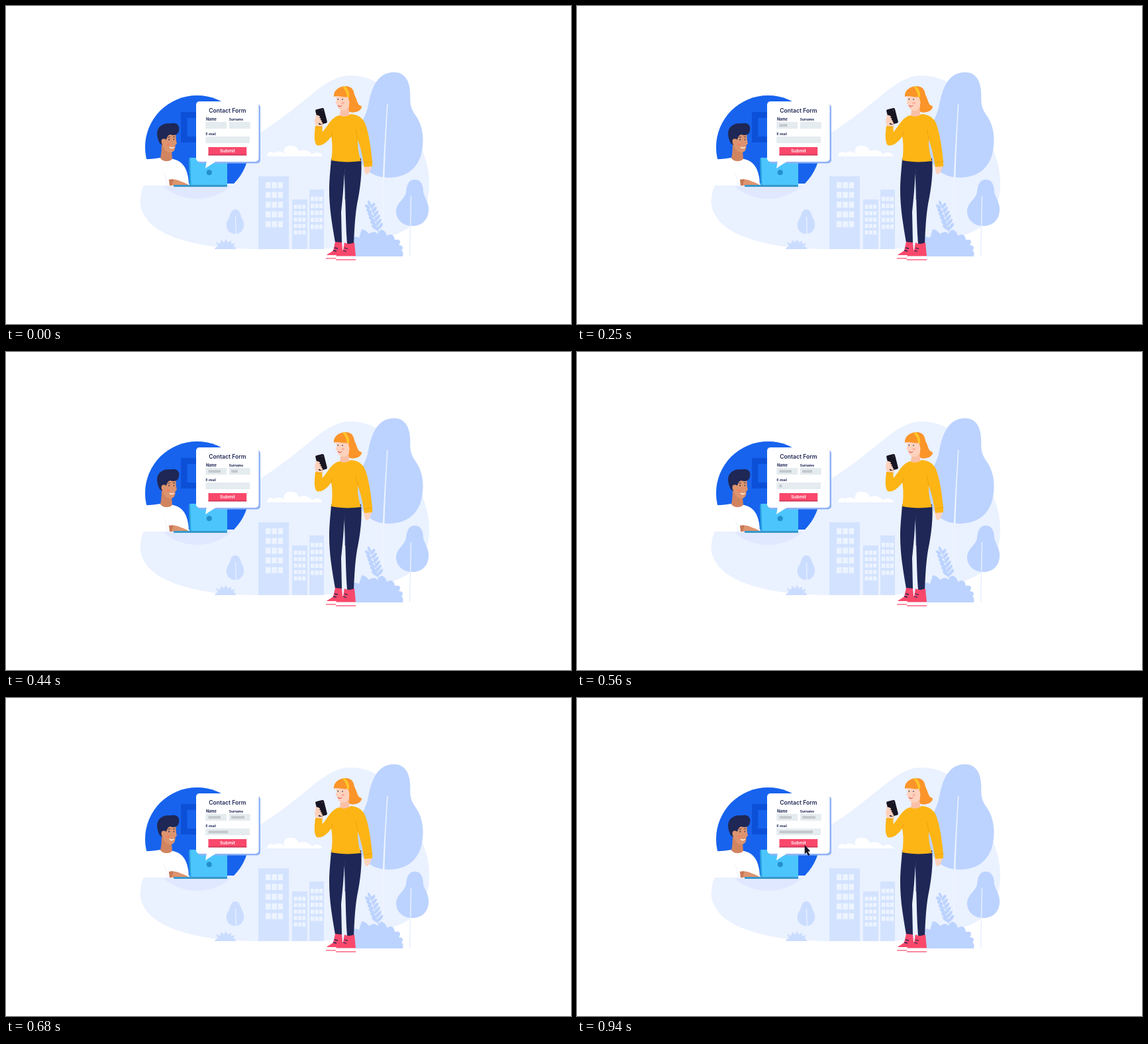
These frames come from a looping animation (853x480 px, 1 s). An HTML page with a canvas:

```html
<!DOCTYPE html>
<html lang="en">
<head>
<meta charset="utf-8">
<title>Contact form</title>
<style>
  html, body { margin: 0; width: 100%; height: 100%; overflow: hidden; background: #fff; }
  canvas { display: block; width: 853px; height: 480px; }
</style>
</head>
<body>
<canvas id="stage"></canvas>
<script>
const W = 853, H = 480, LOOP = 1000, TICKS = 16;
const canvas = document.getElementById('stage');
const ctx = canvas.getContext('2d');
const dpr = window.devicePixelRatio || 1;
canvas.width = Math.round(W * dpr);
canvas.height = Math.round(H * dpr);

const C = {
  blob: '#eaf1ff', building: '#d3e3ff', pane: '#edf4ff', tree: '#bcd3ff',
  blue: '#1763ee', frame: '#0d50d8', navy: '#1e2755', tan: '#dd946e',
  skin: '#fdd2bd', hair: '#fb9429', yellow: '#fdb515', pink: '#f9486b',
  field: '#e5ecf0', bar: '#c3c8cd', laptop: '#4cc5fd', base: '#3798cc'
};

function fill(d, color) {
  ctx.fillStyle = color;
  ctx.fill(new Path2D(d));
}
function line(d, color, width) {
  ctx.strokeStyle = color;
  ctx.lineWidth = width;
  ctx.stroke(new Path2D(d));
}
function rect(x, y, w, h, color) {
  ctx.fillStyle = color;
  ctx.fillRect(x, y, w, h);
}
function round(x, y, w, h, r, color) {
  ctx.fillStyle = color;
  ctx.beginPath();
  ctx.roundRect(x, y, w, h, r);
  ctx.fill();
}
function oval(x, y, rx, ry, color, turn = 0) {
  ctx.fillStyle = color;
  ctx.beginPath();
  ctx.ellipse(x, y, rx, ry, turn, 0, Math.PI * 2);
  ctx.fill();
}
function text(s, x, y, size, color, weight = 700, align = 'left') {
  ctx.font = `${weight} ${size}px Inter, sans-serif`;
  ctx.textAlign = align;
  ctx.fillStyle = color;
  ctx.fillText(s, x, y);
}
const clamp = (v, max) => Math.max(0, Math.min(max, v));

function building(x, y, w, win) {
  rect(x, y, w, 367 - y, C.building);
  for (let r = 0; r < 5; r++)
    for (let c = 0; c < 3; c++)
      rect(win.x + c * win.dx, win.y + r * win.dy, win.w, win.h, C.pane);
}

function backdrop() {
  fill('M208 271 L347 268 C365 238 367 207 383 192 C411 174 431 158 456 138 C480 118 498 105 520 105 ' +
       'C558 105 579 127 597 158 C616 191 639 226 639 267 C639 317 614 338 577 348 ' +
       'C545 357 514 367 455 367 H385 C329 367 278 361 242 344 C204 326 195 296 208 271Z', C.blob);

  fill('M394 227 C394 220 401 218 405 222 C410 218 416 219 420 223 C418 214 424 210 431 211 ' +
       'C438 211 441 215 442 219 C450 216 458 218 462 224 C467 219 475 220 478 227Z', '#fff');

  building(381, 257, 46, { x: 392, y: 266, dx: 9.3, dy: 14.7, w: 7.5, h: 9 });
  building(432, 292, 23, { x: 434.6, y: 300, dx: 6.3, dy: 9.7, w: 5, h: 6 });
  building(458, 277, 22, { x: 460, y: 288, dx: 6.4, dy: 10.5, w: 5.2, h: 6.5 });

  const pale = '#cbddff';
  fill('M346 307 C353 307 354 315 356 320 C363 330 358 344 346 344 C334 344 329 331 336 321 C339 316 339 307 346 307Z', pale);
  line('M346.5 318 L348 367', C.blob, 1.2);
  fill('M315 367 C316 364 318 363 320 363 L317 356 L323 359 L325 353 L329 357 L332 352 L335 357 L340 354 ' +
       'L340 359 L346 358 L343 363 C346 363 347 365 347 367Z', pale);

  // large tree
  fill('M586 100 C602 100 609 113 610 129 C611 145 608 150 619 166 C631 183 632 207 626 227 ' +
       'C618 249 601 259 577 259 C549 259 530 239 530 211 C530 185 540 174 546 154 C551 126 559 100 586 100Z', C.tree);
  fill('M575 148 L576.5 148 C573 207 571 250 570.5 326 L567.5 326 C568 247 572 205 575 148Z', '#eef4ff');

  // small tree
  fill('M617 262 C628 262 630 273 630 281 C632 290 639 297 638 309 C637 324 627 332 613 332 ' +
       'C599 332 589 322 589 310 C589 297 602 292 604 281 C605 272 607 262 617 262Z', C.tree);
  line('M611.5 287 L609.5 378', '#e7efff', 1.5);

  // fern
  line('M547 294 C553 307 560 322 562 342', C.tree, 1.5);
  for (let i = 0; i < 6; i++) {
    const x = 550 + i * 2.2, y = 304 + i * 6.3, r = 4.6 + Math.min(i, 3) * 0.5;
    oval(x - 4, y - 1, r, 2.3, C.tree, 0.65);
    oval(x + 4, y - 3, r, 2.3, C.tree, -0.9);
  }
  oval(548.5, 298, 2, 4.3, C.tree, -0.4);

  fill('M522 378 V352 C525 347 529 348 533 350 L537 337 C541 337 545 340 548 344 ' +
       'C553 341 557 339 561 344 L565 338 C570 337 574 342 575 347 C581 343 586 345 587 353 ' +
       'C593 351 598 354 593 361 C599 361 601 365 597 369 C600 371 600 375 599 378Z', C.tree);
}

function man() {
  oval(288.5, 213, 78.5, 78, C.blue);
  rect(264, 160, 30, 46, C.frame);
  rect(273.5, 169, 20, 28, C.blue);

  // table and the dim lower part of the disc
  ctx.save();
  ctx.beginPath();
  ctx.rect(200, 268, 170, 26);
  ctx.clip();
  rect(208, 268, 150, 25, C.blob);
  rect(204, 268, 30, 3, '#fff');
  ctx.beginPath();
  ctx.rect(200, 272, 170, 22);
  ctx.clip();
  oval(288.5, 213, 78.5, 78, '#dfe8ff');
  ctx.restore();
  fill('M358 268 H372 V292 H310 C332 290 349 281 358 268Z', C.blob);
  fill('M196 293 V268 H208.8 C206 273 204 279 203 293Z', '#fff');

  fill('M206 271 V231 C217 232 224 230 234 229 C248 229 262 231 269 242 C274 250 276 260 276 271Z', '#fff');
  fill('M235 202 L250 218 L251 231 C246 236 237 235 233 230 C235 222 235 211 235 202Z', '#d18460');
  fill('M237 190 C245 187 252 187 256 190 C257 196 256 201 258 208 L255.5 210 C256 216 254 220 249 221 ' +
       'C241 222 236 213 236 204Z', C.tan);
  fill('M232 207 C227 197 226 185 235 180 C240 176 247 178 251 177 C258 176 263 181 261 188 ' +
       'C260 195 254 196 248 194 C244 195 243 198 242 202 C237 198 234 203 236 210Z', C.navy);
  oval(237.4, 204.5, 2.8, 4, C.tan);
  oval(246.2, 201.7, 0.8, 1.1, C.navy);
  oval(253.5, 201.5, 0.7, 1.1, C.navy);
  oval(244.5, 209, 2.4, 1.8, '#ef7f64');
  line('M247 213 Q250 216 253.5 213', '#fff', 1.4);
  line('M244 198.3 L248 197.5 M252 197.4 L255 197.8', C.navy, 0.8);

  line('M238 252 C242 257 243 263 243 271', '#e5eaf5', 0.8);
  fill('M246 262 C255 260 262 264 270 267 L278 271 H248Z', C.tan);
  fill('M246 262 L253 261.5 L250 271 H247Z', '#c87958');

  fill('M277 229 H332 Q334 229 334 231 V271 H279Z', C.laptop);
  fill('M276 231 Q276 229 278 229 L279.5 271 H277Z', '#279fe0');
  round(253, 270, 81, 3, 1, C.base);
  oval(306.8, 251.3, 4, 4, '#258fce');
}

function woman() {
  // legs
  fill('M491 230 H536 C538 250 535 275 530 299 C527 317 526 336 525 360 H515 C513 336 513 311 512 286 ' +
       'L510.5 253 C510 273 508 291 506 311 L507 357 H497 C492 328 488 304 488 278 C488 260 490 246 491 230Z', C.navy);
  line('M511.5 246 C513 264 512 278 512 292', '#364071', 0.7);

  // shoes
  fill('M497 356 L507 357 L509 377 H484 C484 374 490 373 494 369Z', C.pink);
  fill('M484 376 H504 V380 H483Z', '#fff');
  line('M483 381 H503', C.pink, 1.2);
  fill('M511 357 C516 360 521 359 526 357 L528 378 H498 C499 374 506 374 509 368Z', C.pink);
  fill('M498 377.5 H528 V382 H498Z', '#fff');
  line('M498 383 H528', C.pink, 1.3);
  line('M496 365 L501 366 M494 369 L499 370 M511 365 L516 366.5 M509 369 L514 370.5', C.navy, 1.3);

  // lowered hand
  fill('M540 240 L552 240 C551 247 549 253 544 254 C541 252 541 247 540 240Z', C.skin);

  // neck and hair
  fill('M514 127 C524 126 527 136 529 144 C531 149 535 151 537 151 C536 156 532 160 527 160 ' +
       'C522 162 516 159 513 157Z', C.hair);
  fill('M506 149 L518 145 V165 C515 169 506 169 504 166Z', '#f9c0a7');
  fill('M498 134 C504 129 512 130 518 136 C520 146 518 156 511 158 C504 158 500 154 500 149 L497.5 147 L499 142Z', C.skin);
  fill('M495 137 C494 128 502 121 513 121 C521 121 525 126 526 134 C530 141 530 149 537 153 ' +
       'C534 160 525 162 517 157 C520 148 518 141 516 137 C509 139 502 134 495 137Z', C.hair);
  fill('M508 122 L512 121 C516 125 519 131 518 138 L515 137 C514 131 512 126 508 122Z', '#ffc629');
  oval(516.5, 146, 2, 2.7, C.skin);
  oval(501.3, 140.8, 0.7, 1, C.navy);
  oval(508, 141, 0.7, 1, C.navy);
  oval(508.7, 146.5, 2.3, 1.7, '#ffae9e');
  line('M501 150 Q504 153 507 150.3', '#e85c60', 1.1);

  // sweater
  fill('M503 165 C509 168 516 167 520 163 C531 164 538 168 542 177 C548 192 551 215 553 235 ' +
       'L553 242 L541 243 C538 225 535 212 531 202 C531 216 533 225 536 234 C522 236 505 236 491 233 ' +
       'C493 221 493 207 491 197 C486 204 477 213 469 210 C464 204 466 191 467 181 L477 179 ' +
       'C478 184 477 188 478 190 C486 181 491 168 503 165Z', C.yellow);
  line('M531 202 C530 195 529 190 528 186 M491 197 L493 190', '#e79c10', 0.8);
  line('M540.5 236 C545 237 549 236 553 234', '#e79c10', 0.8);
  line('M467 184 L478 182', '#e79c10', 0.7);

  // phone and hand
  fill('M468 181 C465 173 466 168 470 165 L480 174 C480 178 478 181 477 182Z', C.skin);
  ctx.save();
  ctx.translate(476, 166.5);
  ctx.rotate(-0.25);
  round(-6.6, -11.7, 13.2, 23.4, 2, '#171522');
  oval(3.6, -8.5, 1, 1, '#4b4656');
  ctx.restore();
  for (let i = 0; i < 4; i++) oval(470.5 + i * 1.4, 166.5 + i * 3.2, 3.7, 1.6, C.skin, 0.35);
  oval(469.5, 174, 3, 5.5, C.skin);
}

function card(tick) {
  round(289, 148, 95, 89.5, 5, '#91b3f5');
  round(287, 144, 94.5, 91, 5, '#fff');
  fill('M303 234 L301 245 L318 234Z', '#fff');

  text('Contact Form', 334.3, 161, 8.6, C.navy, 600, 'center');
  text('Name', 302, 173, 5.6, C.navy);
  text('Surname', 336.7, 172.6, 4.9, C.navy);
  text('E-mail', 301.6, 195, 4.9, C.navy);

  rect(301.3, 175, 32, 10.3, C.field);
  rect(336.7, 175, 32, 10.3, C.field);
  rect(301.3, 197, 66.7, 10, C.field);

  // each value grows at its own typing speed
  rect(305.5, 178.2, clamp((tick - 1.3) * 4.5, 18.5), 4, C.bar);
  rect(340, 178.2, clamp((tick - 5) * 5, 20), 4, C.bar);
  rect(305.5, 200.2, clamp((tick - 7.7) * 13, tick < 13 ? 42.5 : 50.5), 4, C.bar);

  rect(305.5, 213, 57.7, 12.2, C.pink);
  rect(305.5, 224, 57.7, 1.5, '#cb3154');
  text('Submit', 334.4, 220.8, 6.7, '#fff', 600, 'center');
}

function cursor(tick) {
  if (tick < 13) return;
  const left = 15 - tick;
  ctx.save();
  ctx.translate(343.7 + left * 9, 221.8 + left * 15);
  fill('M0 0 L8.5 9.5 L5 10 L7.8 15 L5.4 16.3 L2.8 11.2 L0 13.8Z', '#161426');
  ctx.restore();
}

function draw(now) {
  const tick = Math.floor((now % LOOP) / LOOP * TICKS);
  ctx.setTransform(dpr, 0, 0, dpr, 0, 0);
  rect(0, 0, W, H, '#fff');
  backdrop();
  man();
  woman();
  card(tick);
  cursor(tick);
}

const start = performance.now();
function loop() {
  draw(performance.now() - start);
  requestAnimationFrame(loop);
}
loop();
</script>
</body>
</html>
```
